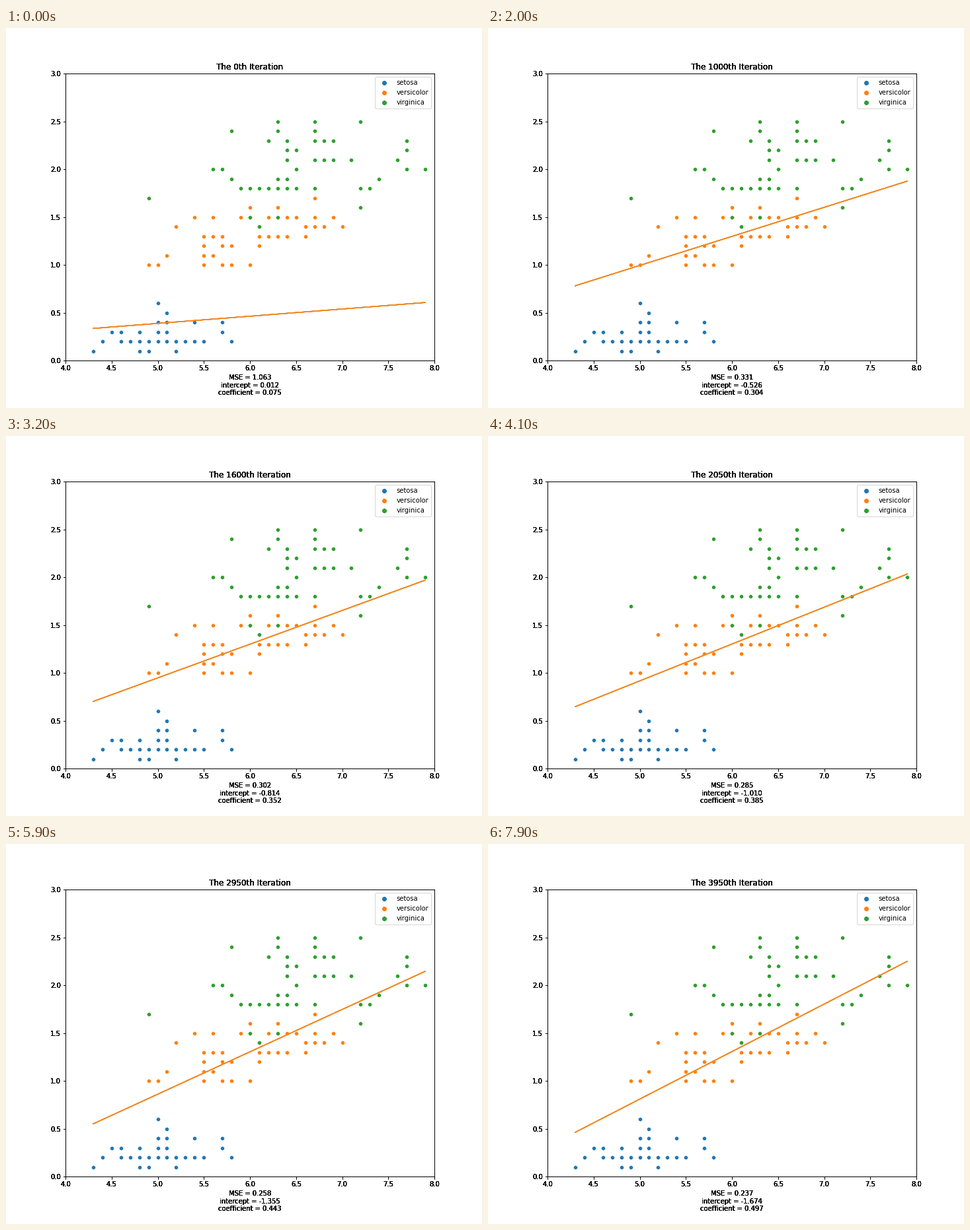
These frames come from a looping animation (720 by 576 pixels, 8 s). A matplotlib script:

```python
import matplotlib.pyplot as plt
from matplotlib.animation import FuncAnimation

FRAMES, INTERVAL = 80, 100
STEPS = 50       # descent steps per frame
RATE = 0.01
LAYERS = 5       # stacked axes give the text its hard, dark edges
X_ENDS = (4.3, 7.9)

# Flower measurements in tenths: {width: lengths}
SPECIES = {
    "setosa": ("#1f77b4", {
        1: [43, 48, 49, 52],
        2: [44, *range(46, 56), 58],
        3: [45, 46, 48, 50, 51, 57],
        4: [50, 51, 54, 57],
        5: [51],
        6: [50],
    }),
    "versicolor": ("#ff7f0e", {
        10: [49, 50, 55, 57, 58, 60],
        11: [51, 55, 56],
        12: [55, 57, 58, 61],
        13: [55, 56, 57, 61, 62, 63, 64, 66],
        14: [52, 61, 66, 67, 68, 70],
        15: [54, 56, 59, 60, 62, 63, 64, 65, 67, 69],
        16: [60, 63],
        17: [67],
        18: [59],
    }),
    "virginica": ("#2ca02c", {
        14: [61],
        15: [60, 63],
        16: [72],
        17: [49],
        18: [*range(59, 66), 67, 72, 73],
        19: [58, 63, 64, 74],
        20: [56, 57, 65, 77, 79],
        21: [64, 67, 68, 69, 71, 76],
        22: [64, 65, 77],
        23: [62, 64, 67, 68, 69, 77],
        24: [58, 63, 67],
        25: [63, 67, 72],
    }),
}

# Moments of the full sample, repeated measurements included
MEAN_X, MEAN_Y = 5.843333, 1.199333
VAR_X, VAR_Y, COV = 0.681122, 0.577133, 0.512829


def descend():
    """Fit y = b + w*x by gradient descent; return (b, w) for each frame."""
    b = w = 0.0
    fits = []
    for step in range(FRAMES * STEPS):
        err = MEAN_Y - b - w * MEAN_X
        grad_w = MEAN_X * err + COV - w * VAR_X
        b += RATE * err
        w += RATE * grad_w
        if step % STEPS == 0:
            fits.append((b, w))
    return fits


def mse(b, w):
    err = MEAN_Y - b - w * MEAN_X
    return err ** 2 + VAR_Y - 2 * w * COV + w ** 2 * VAR_X


fig = plt.figure(figsize=(10, 8), dpi=72, facecolor="white")
fig.subplots_adjust(left=0.125, right=0.9, bottom=0.125, top=0.88)
layers = [fig.add_subplot(facecolor="none") for _ in range(LAYERS)]
for layer in layers:
    layer.set(xlim=(4, 8), ylim=(0, 3))

ax = layers[0]
for name, (color, rows) in SPECIES.items():
    points = [(x / 10, y / 10) for y, xs in rows.items() for x in xs]
    ax.scatter(*zip(*points), s=36, color=color, edgecolors="white",
               linewidths=0.48)
    ax.scatter([], [], s=36, color=color, label=name)
ax.legend(loc="upper right")

# The stroke runs back and forth, which firms up its edges
path_x = X_ENDS * 2
line, = ax.plot(path_x, path_x, color="#f28a25", lw=1.5)

fits = descend()


def update(i):
    b, w = fits[i]
    line.set_ydata([b + w * x for x in path_x])
    title = f"The {i * STEPS}th Iteration"
    label = (f"MSE = {mse(b, w):.3f}\n"
             f"intercept = {b:.3f}\n"
             f"coefficient = {w:.3f}")
    for layer in layers:
        layer.set_title(title)
        layer.set_xlabel(label)


anim = FuncAnimation(fig, update, frames=FRAMES, interval=INTERVAL,
                     repeat=True, repeat_delay=0)
plt.show()
```
